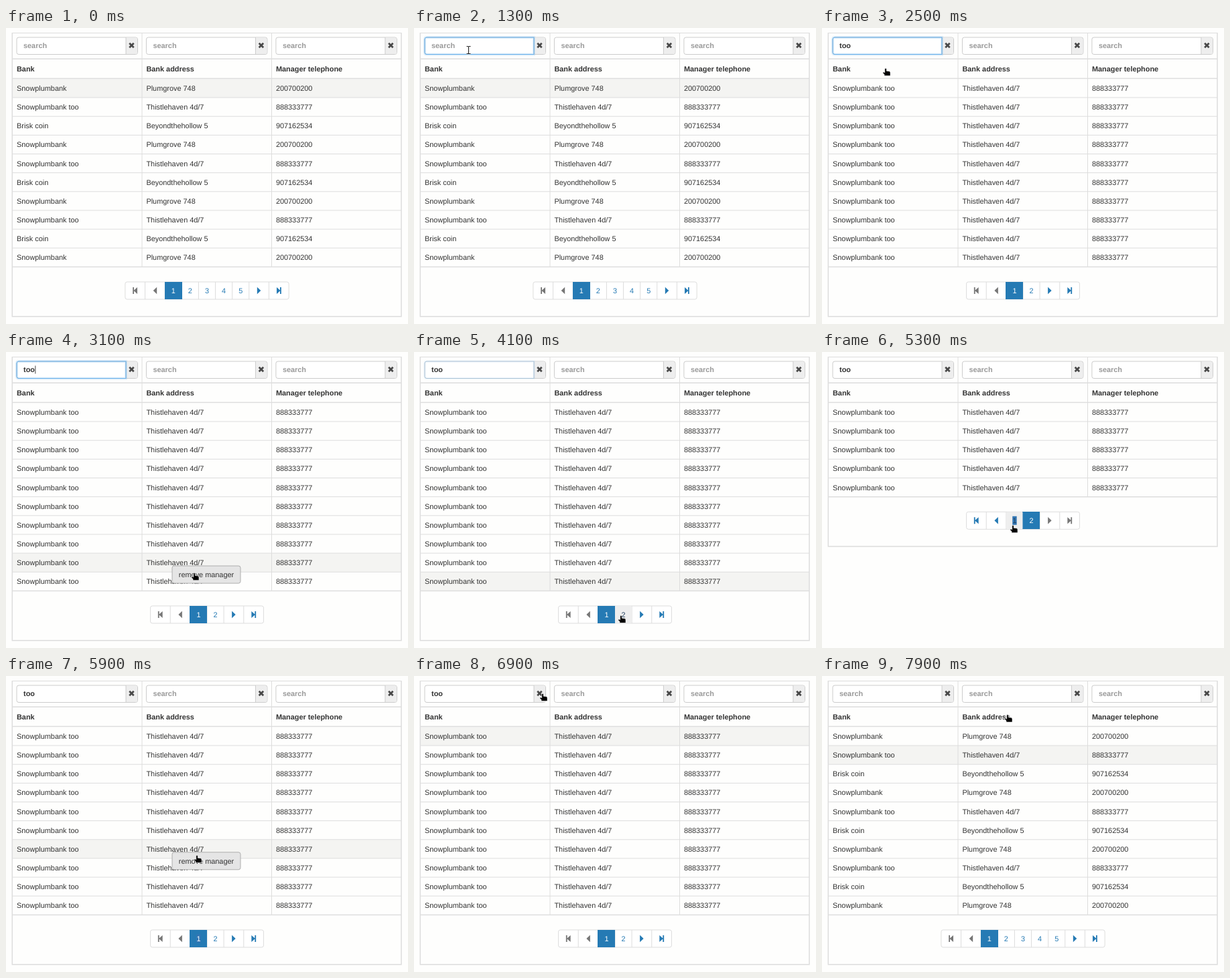
These frames come from a looping animation (600x443 px, 8 s). An HTML page:

```html
<!DOCTYPE html>
<html lang="en">
<head>
<meta charset="utf-8">
<title>Filterable table</title>
<style>
html, body { margin: 0; width: 100%; height: 100%; overflow: hidden; background: #fefefd; }
svg { display: block; width: 600px; height: 443px; font: 10.9px "Liberation Sans", Arial, sans-serif; fill: #333; text-rendering: geometricPrecision; }
.bold { font-weight: bold; }
</style>
</head>
<body>
<svg id="stage" viewBox="0 0 600 443"></svg>
<script>
const STEP = 100, LOOP = 8000;
const BLUE = '#257ab4', LINE = '#ddd';
const COL = 193.45, ROW = 28.15, TOP = 75.9;
const HEADERS = ['Bank', 'Bank address', 'Manager telephone'];
const RECORDS = [
  ['Snowplumbank', 'Plumgrove 748', '200700200'],
  ['Snowplumbank too', 'Thistlehaven 4d/7', '888333777'],
  ['Brisk coin', 'Beyondthehollow 5', '907162534']
];
const ITEMS = Array.from({ length: 45 }, (_, id) => ({ id, cells: RECORDS[id % 3] }));

// Pointer path: time, x, y
const PATH = [
  [100, 20, 85], [200, 50, 62], [300, 74, 42], [400, 74, 42], [500, 76, 38], [800, 81.5, 33],
  [2400, 81.5, 33], [2500, 95, 60], [2700, 190, 200], [2900, 275, 318], [3000, 281, 330],
  [3200, 281, 330.5], [3500, 285, 352], [3800, 300, 385], [4000, 309, 394], [4400, 309, 394],
  [5000, 285, 262], [5100, 285, 259], [5700, 285, 259], [5900, 285, 268], [6300, 190, 170],
  [6500, 95, 88], [6600, 66, 48], [6700, 80, 34], [6900, 192, 26], [7200, 192, 26],
  [7300, 205, 20], [7500, 260, 30], [7700, 298, 48], [7900, 277, 57.5]
];

const within = (t, from, to) => t >= from && t < to;
const text = (x, y, s, extra = '') => `<text x="${x}" y="${y}" ${extra}>${s}</text>`;
const rect = (x, y, w, h, extra) => `<rect x="${x}" y="${y}" width="${w}" height="${h}" ${extra}/>`;
const path = (d, extra = '') => `<path d="${d}" ${extra}/>`;
const line = (d, width = 1) => path(d, `stroke="${LINE}" stroke-width="${width}" fill="none"`);

function pointerAt(t) {
  if (t < PATH[0][0]) return null;
  const next = PATH.findIndex(key => key[0] > t);
  if (next < 0) return PATH.at(-1).slice(1);
  const [t0, x0, y0] = PATH[next - 1], [t1, x1, y1] = PATH[next];
  const k = (t - t0) / (t1 - t0);
  return [x0 + (x1 - x0) * k, y0 + (y1 - y0) * k];
}

function queryAt(t) {
  if (!within(t, 1400, 7000)) return '';
  return 'too'.slice(0, t < 1500 ? 1 : t < 1700 ? 2 : 3);
}

function drawFilters(t, query) {
  let out = '';
  for (let c = 0; c < 3; c++) {
    const x = 16 + c * COL, value = c ? '' : query;
    out += rect(x, 14, 180.5, 25.5, 'rx="3" fill="#fff" stroke="#ccc"')
      + path(`M${x + 163},14.5h15q2,0 2,2v20.500q0,2-2,2h-15z`, 'fill="#eee"')
      + path(`M${x + 163},14v25.500`, 'stroke="#ccc"')
      + path(`M${x + 168.2},22.800l6.500,6.500m0-6.500l-6.500,6.500`, 'stroke="#484848" stroke-width="2.700"')
      + text(x + 10, 30.3, value || 'search', `class="bold" fill="${value ? '#333' : '#999'}"`);
  }
  const focus = within(t, 900, 4100) ? 1 : t === 800 || t === 4100 ? 0.3 : 0;
  if (focus) {
    const box = 'M179,14H19q-3,0-3,3v19.500q0,3 3,3H179z';
    out += path(box, `fill="none" stroke="#66afe9" stroke-width="4" opacity="${focus * 0.2}"`)
      + path(box, `fill="none" stroke="#66afe9" opacity="${focus}"`);
  }
  const caretOn = within(t, 800, 1300) || within(t, 1400, 2300) || within(t, 2800, 3300) || within(t, 3800, 4100);
  if (caretOn) {
    const x = 26.4 + [0, 3.63, 10.3, 17][query.length];
    out += rect(x, 20.5, 0.9, 12, 'fill="#333"');
  }
  return out;
}

function drawTable(rows, active) {
  const end = TOP + rows.length * ROW;
  let out = '';
  rows.forEach((item, i) => {
    const y = TOP + i * ROW;
    if (item.id === active) out += rect(9, y, 581, ROW, 'fill="#f4f4f2"');
    if (i) out += line(`M9,${y}H590`);
    item.cells.forEach((cell, c) => out += text(16 + c * COL, y + 18, cell));
  });
  HEADERS.forEach((name, c) => out += text(16 + c * COL, 65, name, 'class="bold"'));
  return out + line(`M203,7.500V${end}M396.500,7.500V${end}M9,7.500H590`)
    + line(`M9,46.200H590M9,75.600H590M9,${end}H590`, 1.5)
    + line(`M9.300,7V${end + 74.3}H590V7`, 1.5);
}

function pagerLayout(count, top) {
  const labels = ['first', 'prev', ...Array.from({ length: count }, (_, i) => i + 1), 'next', 'last'];
  let x = 300 - (4 * 29.7 + count * 25.1) / 2;
  return labels.map(label => {
    const w = typeof label === 'number' ? 25.1 : 29.7;
    const cell = { label, x, y: top, w };
    x += w;
    return cell;
  });
}

function drawIcon(label, x, y, color) {
  const flip = label === 'next' || label === 'last' ? -1 : 1;
  const shape = label === 'first' || label === 'last'
    ? 'M-3.500,-5h1.800v4.500l5-4.500v10l-5-4.500v4.500h-1.800z' : 'M-2.700,0l5.500-5.300v10.600z';
  return path(shape, `transform="translate(${x} ${y}) scale(${flip} 1)" fill="${color}"`);
}

function drawPager(cells, page, hovered, selected) {
  const pages = cells.length - 4, first = cells[0], last = cells.at(-1);
  const open = cells.find(cell => cell.label === page);
  let out = rect(first.x, first.y, last.x + last.w - first.x, 26, `rx="3" fill="#fff" stroke="${LINE}"`);
  for (const { x, y } of cells.slice(1)) out += line(`M${x},${y}v26`);
  out += rect(Math.round(open.x - 0.6), Math.round(open.y), 26, 26, `fill="${BLUE}"`);
  for (const { label, x, y, w } of cells) {
    const mid = x + w / 2, current = label === page;
    if (!current && hovered === label) out += rect(x + 0.5, y + 0.5, w - 1, 25, 'fill="#eee"');
    if (selected && label === 1) out += rect(mid - 3.2, y + 6.5, 6.4, 13, 'fill="#3276b4"');
    if (typeof label === 'number') {
      const color = current ? '#fff' : hovered === label ? '#23415f' : BLUE;
      out += text(mid, y + 17, label, `text-anchor="middle" fill="${color}"`);
    } else {
      const back = label === 'first' || label === 'prev';
      out += drawIcon(label, mid, y + 13, page === (back ? 1 : pages) ? '#777' : BLUE);
    }
  }
  return out;
}

function drawPointer([x, y], kind) {
  const at = `transform="translate(${x} ${y})"`;
  if (kind === 'beam') {
    const d = 'M-3,-5.500h2q1,0 1,1v9q0,1-1,1h-2M3,-5.500h-2q-1,0-1,1v9q0,1 1,1h2';
    return path(d, `${at} fill="none" stroke="#fff" stroke-width="2.200"`)
      + path(d, `${at} fill="none" stroke="#222" stroke-width="1.100"`);
  }
  const d = kind === 'arrow' ? 'M0,0V12L3,9.500L5,14L7,13L5,8.800H9Z'
    : 'M-1.300,1Q0,-.6 1.300,1V4.200L5.500,4.800Q7,5.200 7,6.800V11.500H-2V9.500L-4.200,7.300Q-4.300,5.800-2.800,6L-1.300,6.800Z';
  return path(d, `${at} fill="#000" stroke="#fff" stroke-width=".6"`);
}

let active = 0;  // id of the row last pointed at

function drawScene(t) {
  const query = queryAt(t), page = within(t, 4300, 5400) ? 2 : 1;
  const matches = ITEMS.filter(item => item.cells[0].includes(query));
  const rows = matches.slice(page * 10 - 10, page * 10);
  const end = TOP + rows.length * ROW;
  const cells = pagerLayout(Math.ceil(matches.length / 10), end + 22.6);
  const pointer = pointerAt(t);
  const buttonRow = within(t, 3000, 3500) ? 8 : within(t, 5800, 6100) ? 6 : -1;
  const buttonY = TOP + buttonRow * ROW + 19;
  let kind = 'hand', hovered, overButton = false;

  if (pointer) {
    const [x, y] = pointer;
    overButton = buttonRow >= 0 && within(x, 248, 350) && within(y, buttonY, buttonY + 26);
    if (within(y, TOP, end) && !overButton) active = rows[Math.floor((y - TOP) / ROW)].id;
    hovered = cells.find(c => within(x, c.x, c.x + c.w) && within(y, c.y, c.y + 26))?.label;
    const overInput = within(y, 14, 39.5) && [0, 1, 2].some(c => within(x - c * COL, 16, 179));
    if (overInput) kind = 'beam';
    else if (y > end && !hovered && !overButton) kind = 'arrow';
  }

  let out = drawTable(rows, active) + drawFilters(t, query)
    + drawPager(cells, page, hovered, within(t, 5200, 6100));
  if (buttonRow >= 0) {
    out += rect(248, buttonY, 102, 26, `rx="3" fill="${overButton ? '#e5e5e5' : '#fff'}" stroke="#adadad"`)
      + text(299, buttonY + 17, 'remove manager', 'text-anchor="middle"');
  }
  return out + (pointer ? drawPointer(pointer, kind) : '');
}

const scenes = Array.from({ length: LOOP / STEP }, (_, i) => drawScene(i * STEP));
const stage = document.getElementById('stage');
const start = performance.now();
let shown = -1;

function tick() {
  const index = Math.floor((performance.now() - start) % LOOP / STEP);
  if (index !== shown) stage.innerHTML = scenes[shown = index];
  requestAnimationFrame(tick);
}
tick();
</script>
</body>
</html>
```
